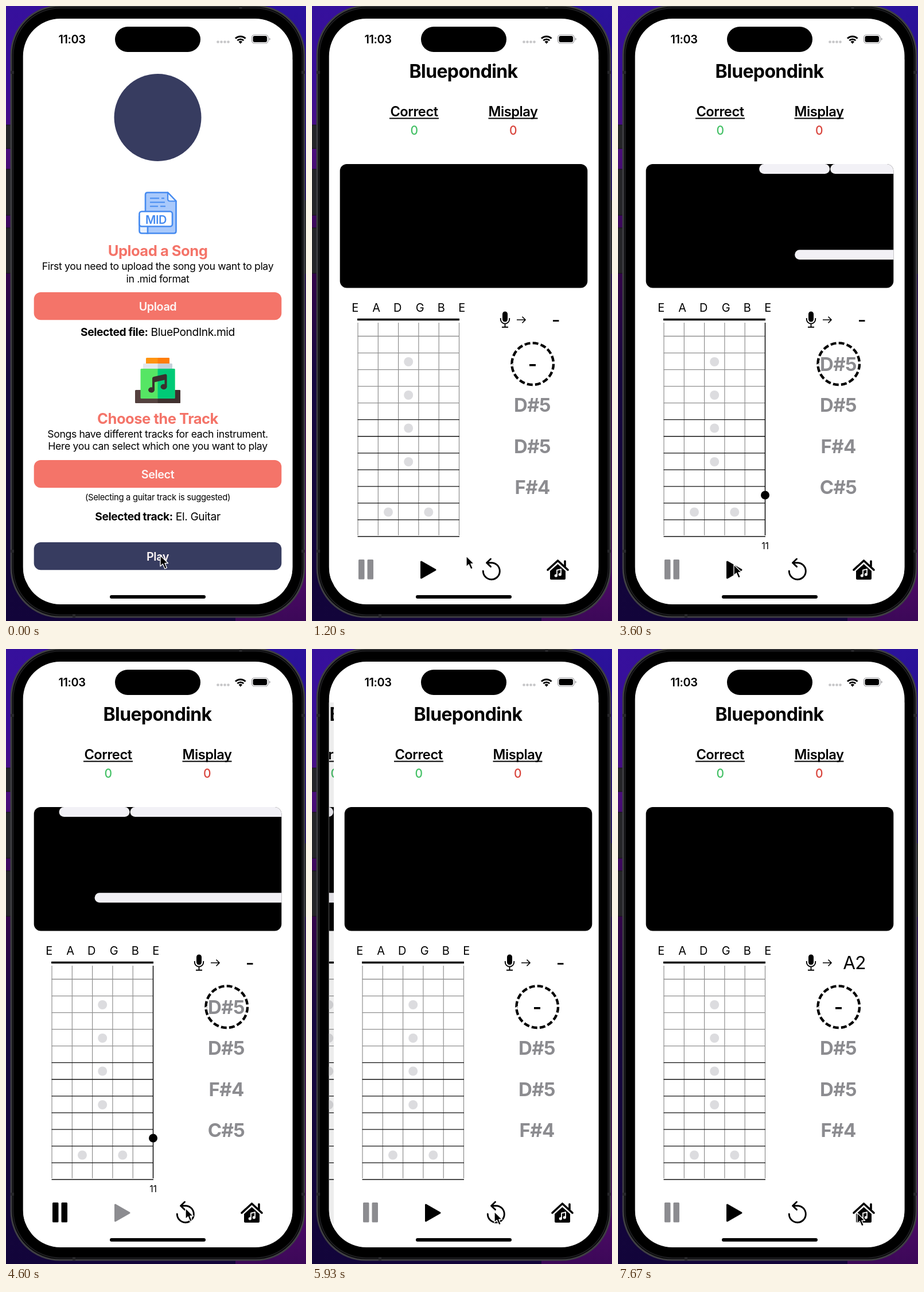
These frames come from a looping animation (523 px wide and 1070 px high, 8 s). An HTML page:

```html
<!DOCTYPE html>
<html lang="en">
<head>
<meta charset="utf-8">
<title>Guitar practice app</title>
<style>
html, body { margin: 0; width: 100%; height: 100%; overflow: hidden; background: #1a0848; }
svg { display: block; width: 100%; height: 100%; }
text { font-family: Inter, "Open Sans", sans-serif; letter-spacing: -.02em; text-anchor: middle; white-space: pre; }
</style>
</head>
<body>
<svg id="stage" viewBox="0 0 523 1070" xmlns="http://www.w3.org/2000/svg"></svg>
<script>
const LOOP = 8000, STEP = 200 / 3;
const SCREEN_W = 469.5;
const NAVY = '#373c60', CORAL = '#f47469', GREY = '#8c8c90', ROW = 71.5;
const stage = document.getElementById('stage');

const text = (x, y, size, weight, str, fill = '#000') =>
  `<text x="${x}" y="${y}" font-size="${size}" font-weight="${weight}" fill="${fill}">${str}</text>`;
const box = (x, y, w, h, r, fill, more = '') =>
  `<rect x="${x}" y="${y}" width="${w}" height="${h}" rx="${r}" fill="${fill}" ${more}/>`;
const dot = (x, y, r, fill) => `<circle cx="${x}" cy="${y}" r="${r}" fill="${fill}"/>`;
const line = (d, width, stroke = '#000') =>
  `<path d="${d}" fill="none" stroke="${stroke}" stroke-width="${width}"/>`;
const bold = s => `<tspan font-weight="700">${s}</tspan>`;
const display = fill => box(29.7, 22, 469.8, 1019, 65, fill);
const pageBox = (fill, more) => box(30, 93, SCREEN_W, 907, 0, fill, more);
const rollBox = fill => box(48.7, 275, 431.6, 215.5, 12, fill);

function phone() {
  const side = (y, h) => box(-2, y, 11, h, 2, '#252528', 'stroke="#141416"');
  return box(0, 0, 523, 1070, 0, 'url(#wallL)') + box(400, 0, 123, 1070, 0, 'url(#wallR)') +
    side(207, 41) + side(284, 80) + side(386, 79) + box(519, 338, 6, 128, 2, '#252528') +
    box(9, 0, 511, 1063, 85, '#000', 'stroke="#3f3f43" stroke-width="3"') +
    box(12.5, 3.5, 504, 1056, 82, '#000', 'stroke="#1d1d20" stroke-width="2"') +
    line('M8 115.500h6M8 948.500h6M515 115.500h6M515 948.500h6M409 -1v6M118.500 1058v6', 5, '#27272a') +
    display('#fff');
}

function statusBar() {
  const dots = [369.5, 375.5, 381.5, 387.5].map(x => dot(x, 62.5, 2.3, '#c6c6c8')).join('');
  const wifi = line('M400 56.500a12.500 12.500 0 0 1 17.500 0', 3) +
    line('M403.300 60a8 8 0 0 1 11 0', 2.8) + '<path d="M405.600 62.300a4.700 4.700 0 0 1 6.400 0l-3.200 3.400z"/>';
  return text(115, 64.8, 20, 600, '11:03') + box(190, 36, 149, 44, 22, '#000') + dots + wifi +
    box(428.5, 50, 28.5, 15, 4.8, 'none', 'stroke="#a0a0a3" stroke-width="1.2"') +
    box(430.5, 52, 24.5, 11, 3, '#000') + '<path d="M458.700 55v5q2-.8 2-2.500t-2-2.500z" fill="#a0a0a3"/>' +
    box(181, 1025, 167, 6, 3, '#000');
}

function fileIcon() {
  const blue = '#468bf0';
  return `<path d="M247 324.500h35l14.500 15v52q0 4-4 4h-45.500q-4 0-4-4v-63q0-4 4-4z" fill="#a9c9fb" stroke="${blue}" stroke-width="2.600"/>` +
    `<path d="M282 324.500v11q0 4 4 4h10.500z" fill="#e6f0fe" stroke="${blue}" stroke-width="2.200" stroke-linejoin="round"/>` +
    line('M251 334.500h16M271 334.500h5M251 341.500h26M251 348.500h14M269 348.500h9', 2.2, blue) +
    `<path d="M232.500 368v23q0 4.500 4.500 4.500h10V384z" fill="#e6f0fe" stroke="${blue}" stroke-width="2.600"/>` +
    box(232.5, 357.5, 57.5, 26, 4, '#fff', `stroke="${blue}" stroke-width="2.600"`) +
    text(261.5, 378.5, 20, 600, 'MID', blue);
}

function trackIcon() {
  const pair = (x, y, w, h, a, b) => box(x, y, w, h, 1.5, a) + box(x + w / 2, y, w / 2, h, 1.5, b);
  return pair(244, 612, 41, 13, '#ff9410', '#ff7d08') + pair(239, 622, 51, 12, '#e3e9ee', '#c5d0da') +
    pair(225, 668, 79, 23, '#54413f', '#40312f') + pair(234.5, 631, 60, 52, '#56e664', '#00ca77') +
    '<g fill="#3b2f2e"><path d="M255 668v-20q0-2.500 2.500-3l20-4.500q3-.6 3 2.400v19h-4v-11.500l-17.500 4V668z"/>' +
    '<ellipse cx="253.500" cy="668" rx="5.500" ry="4.700"/><ellipse cx="275" cy="662.500" rx="5.500" ry="4.700"/></g>';
}

function homePage() {
  const button = (y, label, fill) => box(48.7, y, 431.6, 48.3, 12, fill) + text(264.5, y + 31.7, 19.8, 600, label, '#fdf6f5');
  const body = (y, s) => text(264.5, y, 17.65, 400, s);
  return '<g id="home">' + pageBox('#fff') +
    dot(264.5, 194, 76, NAVY) + fileIcon() +
    text(264.5, 435, 25.6, 700, 'Upload a Song', CORAL) +
    body(459, 'First you need to upload the song you want to play') + body(480.5, 'in .mid format') +
    button(498, 'Upload', CORAL) +
    text(264.5, 574, 19.2, 400, bold('Selected file:') + ' BluePondInk.mid') +
    trackIcon() + text(264.5, 727, 25.6, 700, 'Choose the Track', CORAL) +
    body(750.5, 'Songs have different tracks for each instrument.') +
    body(772, 'Here you can select which one you want to play') +
    button(790, 'Select', CORAL) + text(264.5, 860, 14.75, 400, '(Selecting a guitar track is suggested)') +
    text(264.5, 895, 19.2, 400, bold('Selected track:') + ' El. Guitar') +
    button(933, 'Play', NAVY) + pageBox('#000', 'class="dim"') + '</g>';
}

function fretboard() {
  const xs = [0, 1, 2, 3, 4, 5].map(i => 80 + i * 35.3);
  const labels = [75, 112, 149, 188, 225, 261].map((x, i) => text(x, 532, 20, 400, 'EADGBE'[i])).join('');
  let frets = '';
  for (let i = 0; i < 13; i++) frets += line(`M79.500 ${574.5 + i * 29.04}H257`, 1.3, i < 5 ? '#909090' : '#111');
  const marks = [619, 677, 734.5, 793].map(y => dot(168.2, y, 8, '#dcdcdf')).join('');
  return labels + line('M79 545.500H257', 3.6) + marks + dot(133, 880.5, 8, '#dcdcdf') + dot(203.3, 880.5, 8, '#dcdcdf') +
    xs.map(x => line(`M${x} 551V921`, 1.1, '#858585')).join('') + frets +
    '<g class="fret">' + line('M256.500 551V921', 1.4) + dot(256.5, 851, 7.5, '#000') +
    text(256.5, 945, 16, 400, '11') + '</g>';
}

function listenPanel() {
  const notes = ['D#5', 'D#5', 'F#4', 'C#5'].map((n, i) => text(384, 706 + i * ROW, 33, 700, n, GREY)).join('');
  return box(332, 531.5, 9, 18, 4.5, '#000') +
    line('M328.800 543v2a7.700 7.700 0 0 0 15.400 0v-2M336.500 553v5.500M331 558.800h11', 1.9) +
    line('M357 546h15M366.500 540.500l5.500 5.500l-5.500 5.500', 1.6) +
    '<g class="quiet">' + box(420, 546.3, 10.5, 2.8, 0, '#000') + '</g>' +
    '<g class="heard">' + text(412, 557, 31.5, 400, 'A2') + '</g>' +
    '<g clip-path="url(#list)"><g class="notes">' + box(379, 623, 11, 3.6, 0, '#000') + notes + '</g></g>' +
    '<circle cx="384.700" cy="622.700" r="36.300" fill="none" stroke="#000" stroke-width="4.400" pathLength="160" stroke-dasharray="7 3"/>';
}

function controls() {
  return '<path class="pause" d="M82.500 963h7.500q1.500 0 1.500 1.500v31.500q0 1.500-1.500 1.500h-7.500q-1.500 0-1.500-1.500v-31.500q0-1.500 1.500-1.500z' +
    'm15.500 0h7.500q1.500 0 1.500 1.500v31.500q0 1.500-1.500 1.500h-7.500q-1.500 0-1.500-1.500v-31.500q0-1.500 1.500-1.500z"/>' +
    '<path class="play" d="M190.500 967V995L215 981Z" stroke-width="3" stroke-linejoin="round"/>' +
    '<g class="redo" stroke-linecap="round" stroke-linejoin="round">' +
    line('M305 968.700H313A14.500 14.500 0 1 1 298.300 983M311.500 962l-7 6.700l7 6.700', 2.9) + '</g>' +
    '<g stroke-linecap="round" stroke-linejoin="round">' + line('M411 981L428.500 965L446 981M441 966v9', 3.6) + '</g>' +
    '<path d="M415 983L428.500 971L442 983v13q0 2-2 2h-23q-2 0-2-2z"/>' +
    line('M427 990.500v-9l7-1.600v9', 1.8, '#fff') + dot(425.3, 991, 2.6, '#fff') + dot(432.3, 989, 2.6, '#fff');
}

function gamePage(id) {
  const bar = (x, y, w) => box(480 + x, y, w, 17, 8.5, '#f2f1f6');
  const score = (x, label, fill) => text(x, 191.5, 23.7, 600, label) +
    line(`M${x - 43} 195.500h86`, 2) + text(x, 223.5, 21, 500, '0', fill);
  return `<g id="${id}">` + pageBox('#fff') +
    text(264, 125, 32, 700, 'Bluepondink') + score(178, 'Correct', '#45c167') + score(350.5, 'Misplay', '#d9453d') +
    rollBox('#000') +
    '<g clip-path="url(#roll)"><g class="bars">' + bar(0, 275, 123) + bar(124, 275, 400) + bar(62, 424.3, 400) + '</g></g>' +
    fretboard() + listenPanel() + controls() + pageBox('#000', 'class="dim"') + '</g>';
}

const grad = (id, stops) => `<linearGradient id="${id}" x2="0" y2="1">` +
  stops.map(([o, c]) => `<stop offset="${o}" stop-color="${c}"/>`).join('') + '</linearGradient>';
const clip = (id, shape) => `<clipPath id="${id}">${shape}</clipPath>`;

stage.innerHTML = '<defs>' +
  grad('wallL', [[0, '#36109c'], [.12, '#390e98'], [.22, '#4c0e80'], [.43, '#34044a'], [.6, '#16083f'], [1, '#12043a']]) +
  grad('wallR', [[0, '#2b129c'], [.2, '#270f86'], [.35, '#1b0a58'], [.6, '#300846'], [.9, '#520b6a'], [1, '#3c0858']]) +
  clip('screen', display('#fff')) + clip('roll', rollBox('#fff')) +
  clip('list', box(330, 586, 110, 290, 0, '#fff')) + '</defs>' +
  phone() + '<g clip-path="url(#screen)">' + homePage() + gamePage('first') + gamePage('second') + '</g>' + statusBar() +
  '<path id="cursor" d="M0 0V18.800L4.300 14.800L7.900 23L11.400 21.500L7.900 13.500H13.600Z" stroke="#fff" stroke-width="1.300" stroke-linejoin="round"/>';

const pages = Object.fromEntries(['home', 'first', 'second'].map(id => [id, document.getElementById(id)]));
const cursor = document.getElementById('cursor');

const clamp = (v, lo, hi) => Math.min(hi, Math.max(lo, v));
const smooth = p => (p = clamp(p, 0, 1), p * p * (3 - 2 * p));
// Critically damped spring of a navigation push
const spring = ms => { const k = Math.max(0, ms) * .01826; return 1 - (1 + k) * Math.exp(-k); };

// Cursor stops: time, x, y
const TRAIL = [[0, 269, 956], [1400, 269, 957], [1730, 203, 974], [1950, 203, 974], [2270, 146, 983], [2600, 90, 980],
  [3130, 90, 980], [3530, 202, 972], [4000, 202, 972], [4600, 313, 973], [4800, 316, 976], [5000, 318, 979],
  [6420, 318, 979], [6870, 158, 986], [7270, 263, 980], [7640, 417, 981], [8000, 417, 981]];

function cursorAt(t) {
  const i = TRAIL.findIndex(p => p[0] > t);
  const [t0, x0, y0] = TRAIL[i - 1], [t1, x1, y1] = TRAIL[i];
  const p = smooth((t - t0) / (t1 - t0));
  return [x0 + (x1 - x0) * p, y0 + (y1 - y0) * p];
}

const move = (el, x, y = 0) => el.setAttribute('transform', `translate(${x.toFixed(2)} ${y.toFixed(2)})`);
const show = (el, on) => el.setAttribute('visibility', on ? 'inherit' : 'hidden');

function place(page, enter, leave) {
  move(page, Math.round((1 - enter) * SCREEN_W - leave * SCREEN_W * .3));
  page.querySelector('.dim').setAttribute('opacity', leave * leave * .075);
  show(page, enter > 0 && leave < .9995);
}

function setGame(page, s) {
  const $ = c => page.querySelector('.' + c);
  const playFill = s.playing ? GREY : '#000';
  move($('bars'), -s.scroll);
  move($('notes'), 0, -s.shift * ROW);
  show($('fret'), s.shift > 0);
  show($('heard'), s.heard);
  show($('quiet'), !s.heard);
  $('pause').setAttribute('fill', s.playing ? '#000' : GREY);
  $('play').setAttribute('fill', playFill);
  $('play').setAttribute('stroke', playFill);
  $('redo').setAttribute('opacity', s.pressed ? .35 : 1);
}

function render(ms) {
  const t = Math.floor((ms + 4) / STEP) * STEP % LOOP;
  const push1 = spring(t - 507.5), push2 = spring(t - 5601.5);
  place(pages.home, 1, push1);
  place(pages.first, push1, push2);
  place(pages.second, push2, 0);
  setGame(pages.first, {
    playing: t >= 1850 && t < 3100 || t >= 3800,
    scroll: .192 * (clamp(t - 1882, 0, 1218) + clamp(t - 3800, 0, 1005)),
    shift: smooth((t - 1943) / 350),
    pressed: t >= 5190,
    heard: false
  });
  setGame(pages.second, { playing: false, scroll: 0, shift: 0, pressed: false, heard: t >= 6120 });
  move(cursor, ...cursorAt(t));
}

const start = performance.now();
function tick() {
  render((performance.now() - start) % LOOP);
  requestAnimationFrame(tick);
}
tick();
</script>
</body>
</html>
```
